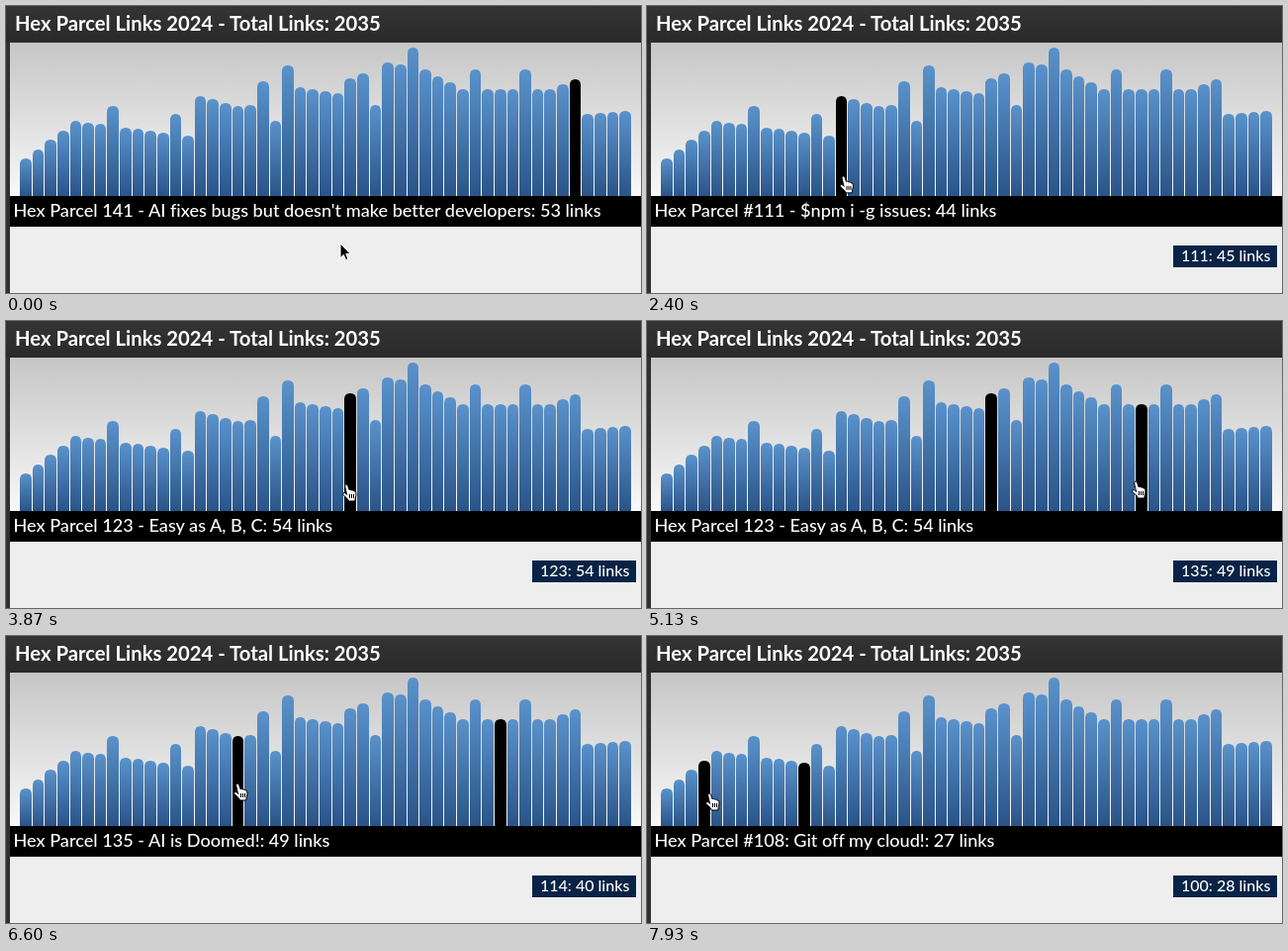
Recreate the animation shown at these times as an HTML page. Size 642 by 290 pixels, loop 8000 ms.

```html
<!DOCTYPE html>
<html lang="en">
<head>
<meta charset="utf-8">
<title>Link chart</title>
<style>
  html, body { margin: 0; width: 100%; height: 100%; overflow: hidden; background: #eee; }
  svg { display: block; width: 642px; height: 290px; }
  text { font-family: Lato, sans-serif; font-weight: 500; font-variant-ligatures: none; fill: #fff; white-space: pre; }
</style>
</head>
<body>
<svg viewBox="0 0 642 290">
  <defs>
    <linearGradient id="head" x2="0" y2="1"><stop stop-color="#343434"/><stop offset="1" stop-color="#2a2a2a"/></linearGradient>
    <linearGradient id="back" x2="0" y2="1"><stop stop-color="#c6c6c6"/><stop offset="1" stop-color="#f8f8f8"/></linearGradient>
    <linearGradient id="blue" x2="0" y2="1"><stop stop-color="#5a92cb"/><stop offset="1" stop-color="#2a5488"/></linearGradient>
  </defs>
  <rect width="642" height="290" fill="#eee"/>
  <rect width="4" height="290" fill="#303030"/>
  <rect width="642" height="37" fill="url(#head)"/>
  <text x="9" y="25" font-size="20.25" style="font-weight:700">Hex Parcel Links 2024 - Total Links: 2035</text>
  <rect x="4" y="37" width="638" height="155" fill="url(#back)"/>
  <g id="bars"></g>
  <rect x="4" y="192" width="638" height="31"/>
  <text id="caption" x="7.5" y="213" font-size="18.1"></text>
  <g id="tip">
    <rect x="532" y="242" width="105" height="22" fill="#082346"/>
    <text id="tipText" x="540" y="258" font-size="16"></text>
  </g>
  <path id="arrow" d="M0 0V14.5L3.3 11.4 5.5 16.6 8 15.5 5.8 10.5H10.2Z" stroke="#fff"/>
  <g id="hand" stroke="#000" stroke-linejoin="round">
    <path fill="#fff" d="M4 8.5 2.6 2.4Q2.4.8 3.8.6T5.6 1.9L7 6.2Q8.4 5.2 9.3 6.6 11 5.9 11.6 7.4 13.4 7 13.8 8.8 14.4 11.5 13.3 14L12.8 17.5H6.3L5.6 15.5Q3 13.4.7 10.8.3 9 2 9T4.6 11Z"/>
    <path d="M7.5 10.5v4M9.5 10.5v4M11.5 10.5v4"/>
  </g>
</svg>
<script>
const LOOP = 8000, FPS = 15, LEFT = 14, PITCH = 12.63, BASE = 192, FIRST_ISSUE = 97, BARS = 49;

// Outline of the bar tops as [bar, y], with single bars that stand out of it.
const outline = [
  [0, 154], [4, 116], [13, 131], [14, 91], [17, 101], [18, 100], [19, 76], [25, 88],
  [26, 73], [29, 57], [32, 64], [35, 84], [42, 84], [44, 74], [45, 109], [48, 106]
];
const peaks = [7, 12, 21, 31, 36, 40], dips = [20, 28];

// Pointer moves: [start tick, end tick, x, y]
const home = [338, 240];
const moves = [
  [4, 17, 235, 173], [17, 26, 196, 173], [35, 46, 345, 166], [67, 76, 495, 163],
  [89, 98, 235, 150], [99, 103, 159, 155], [114, 118, 64, 160]
];

// [tick, bar, caption]
const clicks = [
  [0, 44, "141 - AI fixes bugs but doesn't make better developers: 53"],
  [30, 14, "#111 - $npm i -g issues: 44"],
  [58, 26, "123 - Easy as A, B, C: 54"],
  [83, 38, "135 - AI is Doomed!: 49"],
  [112, 11, "#108: Git off my cloud!: 27"]
];

const $ = id => document.getElementById(id);
const mix = (a, b, k) => a + (b - a) * k;
const clamp = k => Math.min(1, Math.max(0, k));
const ease = k => k * k * (3 - 2 * k);
const links = top => Math.round((183 - top) / 2.03);
const barX = i => Math.round(LEFT + i * PITCH);
const show = (el, on) => el.setAttribute("visibility", on ? "visible" : "hidden");

function topOf(bar) {
  const n = Math.max(1, outline.findIndex(p => p[0] >= bar));
  const [a, ya] = outline[n - 1], [b, yb] = outline[n];
  const y = mix(ya, yb, (bar - a) / (b - a));
  return y - (peaks.includes(bar) ? 20 : 0) + (dips.includes(bar) ? 38 : 0);
}

const tops = Array.from({ length: BARS }, (_, i) => topOf(i));
const bars = tops.map((top, i) => {
  const bar = document.createElementNS("http://www.w3.org/2000/svg", "path");
  const x = barX(i), right = barX(i + 1) - 1, mid = (x + right) / 2;
  const y = Math.round(top);
  bar.setAttribute("d", `M${x} ${BASE}V${y + 6}Q${x} ${y} ${mid} ${y}T${right} ${y + 6}V${BASE}Z`
    .replace(`T${right} ${y + 6}`, `Q${right} ${y} ${right} ${y + 6}`));
  $("bars").append(bar);
  return bar;
});

const pointerAt = tick => moves.reduce(([x, y], [start, end, toX, toY]) => {
  const k = ease(clamp((tick - start) / (end - start)));
  return [mix(x, toX, k), mix(y, toY, k)];
}, home);

// The highlight follows the pointer one tick late.
function hoverAt(tick) {
  const [x, y] = pointerAt(tick - 1);
  return y < BASE ? Math.floor((x - LEFT) / PITCH) : -1;
}

function draw(tick) {
  const [x, y] = pointerAt(tick);
  const hover = hoverAt(tick);
  const [, selected, caption] = clicks.filter(c => c[0] <= tick).pop();

  bars.forEach((bar, i) =>
    bar.setAttribute("fill", i === hover || i === selected ? "#000" : "url(#blue)"));
  $("caption").textContent = `Hex Parcel ${caption} links`;
  show($("tip"), hover >= 0);
  if (hover >= 0) $("tipText").textContent = `${FIRST_ISSUE + hover}: ${links(tops[hover])} links`;

  show($("hand"), y < BASE);
  show($("arrow"), y >= BASE);
  $("hand").setAttribute("transform", `translate(${x - 5} ${y - 1.5})`);
  $("arrow").setAttribute("transform", `translate(${x} ${y})`);
}

const start = performance.now();
function frame() {
  const t = (performance.now() - start) % LOOP;
  draw(Math.min(119, Math.floor(t * FPS / 1000 + 0.06)));
  requestAnimationFrame(frame);
}
frame();
</script>
</body>
</html>
```
